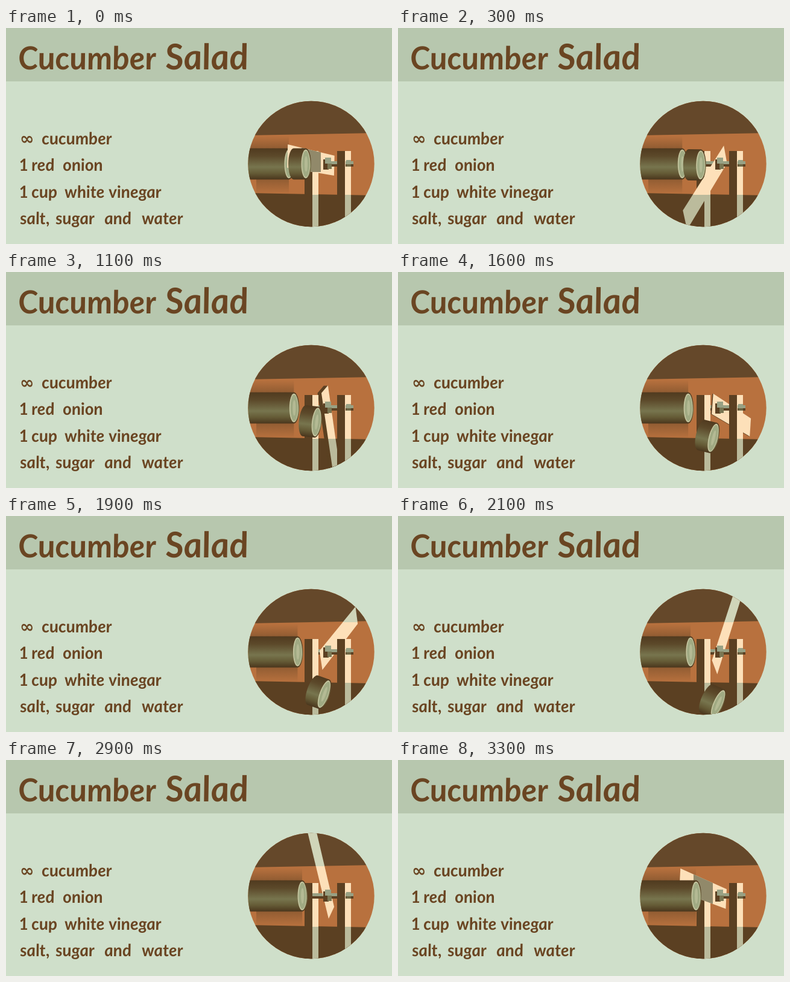
An HTML page with a canvas that plays this animation: 640x360 px, repeating every 3.4 s.

```html
<!DOCTYPE html>
<html lang="en">
<head>
<meta charset="utf-8">
<title>Cucumber Salad</title>
<style>
html, body { margin: 0; width: 100%; height: 100%; overflow: hidden; background: #cfdfca; }
svg, canvas { position: absolute; left: 0; top: 0; }
text { font: italic bold 28px Lato, "Open Sans", sans-serif; fill: #6a4522; }
.title { font-size: 53px; }
.wide { font-size: 59px; }
.sign { font: bold 28px "DejaVu Sans", sans-serif; }
</style>
</head>
<body>
<svg width="640" height="360">
  <rect width="640" height="89" fill="#b7c7ae"/>
  <text class="title" transform="translate(0 69) skewX(6)"><tspan x="22">Cucumber</tspan> <tspan class="wide" x="266">Salad</tspan></text>
  <g transform="translate(0 194) skewX(6)">
    <text class="sign" x="24">∞</text>
    <text x="60">cucumber</text>
  </g>
  <text transform="translate(0 238) skewX(6)"><tspan x="22">1</tspan> <tspan x="43">red</tspan> <tspan x="95">onion</tspan></text>
  <text transform="translate(0 283) skewX(6)"><tspan x="22">1</tspan> <tspan x="43">cup</tspan> <tspan x="98">white</tspan> <tspan x="171">vinegar</tspan></text>
  <text transform="translate(0 327) skewX(6)"><tspan x="24">salt,</tspan> <tspan x="83">sugar</tspan> <tspan x="164">and</tspan> <tspan x="226">water</tspan></text>
</svg>
<canvas id="stage" width="640" height="360"></canvas>
<script>
const c = document.getElementById('stage').getContext('2d');
const LOOP = 3400, STEP = 100;
const BROWN = '#5b4022', CREAM = '#fde0b9', STEEL = '#98a184';
const HUB = { x: 533, y: 227 };
// time in ms, arm angle in degrees from upright, turning towards the viewer
const TURN = [[0, -274], [700, -197], [1100, -157], [1600, -102],
              [2100, -43], [2900, 35], [3300, 82], [3400, 86]];

function gradient(y0, y1, stops) {
  const g = c.createLinearGradient(0, y0, 0, y1);
  stops.forEach(([at, color]) => g.addColorStop(at, color));
  return g;
}
function box(x, y, w, h, color) {
  c.fillStyle = color;
  c.fillRect(x, y, w, h);
}
function poly(points, color) {
  c.beginPath();
  points.forEach(([x, y]) => c.lineTo(x, y));
  c.closePath();
  c.fillStyle = color;
  c.fill();
}
function oval(x, rx, ry, color) {
  c.beginPath();
  c.ellipse(x, 0, rx, ry, 0, 0, 7);
  c.fillStyle = color;
  c.fill();
}

const skin = gradient(-26, 26, [[0, '#503a1f'], [.25, '#5c492a'], [.6, '#77754e'], [.8, '#655b36'], [1, '#4a361d']]);
const wood = gradient(100, 340, [[0, '#d0d5b9'], [.32, '#d0d5b9'], [.32, CREAM], [.74, CREAM], [.74, '#bbbb9c'], [1, '#bbbb9c']]);

function armAngle(t) {
  const i = TURN.findIndex(k => k[0] > t);
  const [t0, a0] = TURN[i - 1], [t1, a1] = TURN[i];
  return (a0 + (a1 - a0) * (t - t0) / (t1 - t0)) * Math.PI / 180;
}

// A length of cucumber whose cut face is centred on x, y
function cucumber(x, y, length, tilt) {
  c.save();
  c.translate(x, y);
  c.rotate(tilt);
  c.beginPath();
  c.ellipse(-length, 0, 9, 26, 0, Math.PI / 2, Math.PI * 1.5);
  c.ellipse(0, 0, 9, 26, 0, -Math.PI / 2, Math.PI / 2);
  c.closePath();
  c.fillStyle = skin;
  c.fill();
  oval(0, 7.5, 24, '#c6c6a0');
  oval(.3, 6.2, 22, '#a0aa83');
  oval(.5, 2.5, 13, '#b4ba94');
  c.restore();
}

function arm(angle) {
  const s = Math.sin(angle), k = Math.cos(angle);
  const project = (along, across) => {
    const h = -s * along + k * across, v = -k * along - s * across;
    const near = 1 / (1 + .0007 * h);
    return [HUB.x + .34 * h * near, HUB.y + v * near];
  };
  const face = [project(172, 17), project(172, -17), project(-34, -17), project(-34, 17)];
  // the shaded edge shows while it leans down towards the viewer
  if (s < 0) {
    for (let d = -7 * k; d > 0; d--) poly(face.map(([x, y]) => [x - d, y]), BROWN);
  }
  poly(face, wood);
  if (s > .9) {
    c.save();
    c.clip();
    box(490, 190, 32, 50, '#91896a');
    c.restore();
  }
}

function post(x) {
  box(x, 205, 13, 140, BROWN);
  box(x + 13, 205, 10, 140, wood);
}
function shaft(x, w) {
  box(x, 222, w, 5, STEEL);
  box(x, 227, w, 4, BROWN);
}

function wall(end) {
  box(400, 120, 212, 212, '#b8713e');
  poly([[400, 120], [612, 120], [612, 175], [400, 179]], '#65482a');
  const dark = 'rgba(91,64,34,.45)', clear = 'rgba(91,64,34,0)';
  box(400, 180, end - 400, 22, gradient(180, 202, [[0, clear], [1, dark]]));
  box(415, 250, end - 415, 27, gradient(250, 277, [[0, dark], [1, clear]]));
  poly([[400, 275], [612, 279], [612, 332], [400, 332]], BROWN);
}

function draw(t) {
  const sec = t / 1000, angle = armAngle(t), end = 469 + 7.6 * sec;
  const cutting = t < 400, near = Math.sin(angle) > 0;
  const body = () => cucumber(end, 226.5, 100, 0);
  c.clearRect(0, 0, 640, 360);
  c.save();
  c.beginPath();
  c.arc(506, 226.5, 104.7, 0, 7);
  c.clip();
  wall(end);
  if (near) post(495);
  if (cutting) body();
  shaft(508, 25);
  arm(angle);
  if (!near) post(495);
  // nut and the far half of the shaft
  shaft(533, 18);
  box(526, 219, 9, 17, BROWN);
  box(529, 216, 10, 10, STEEL);
  box(533, 226, 7, 9, '#7a7653');
  post(549);
  shaft(563, 13);
  box(564, 220, 8, 11, STEEL);
  box(564, 227, 8, 4, '#6e6644');
  if (!cutting) body();
  cucumber(497 + 16 * sec, 226.5 + 19.5 * sec * sec, 20, .094 * sec * sec);
  c.restore();
}

function tick() {
  const t = performance.now() % LOOP;
  draw(Math.floor(t / STEP) * STEP);
  requestAnimationFrame(tick);
}
tick();
</script>
</body>
</html>
```
